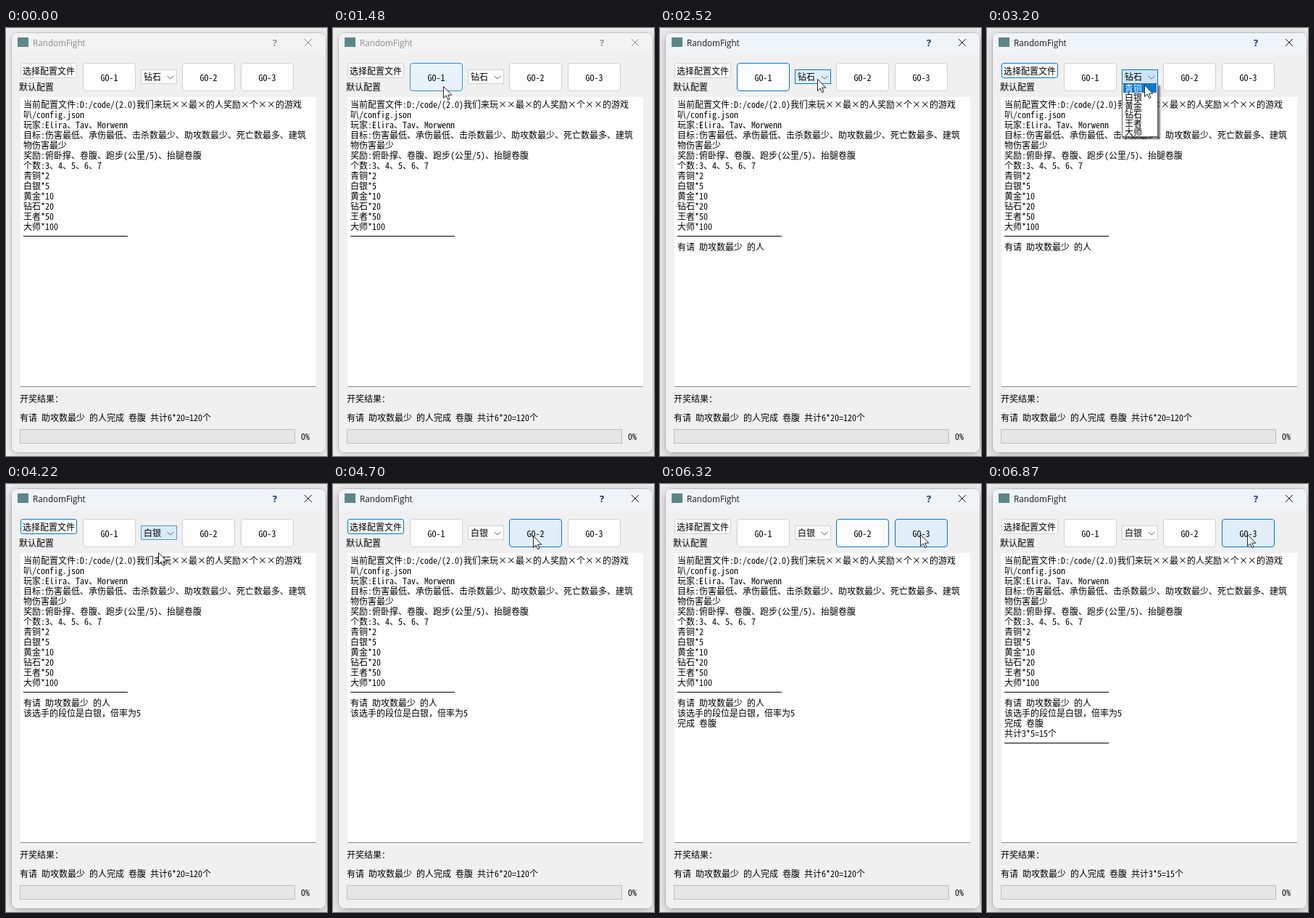
Recreate the animation shown at these times as an HTML page. Size 443 px wide and 589 px high, loop 8000 ms.

```html
<!DOCTYPE html>
<html lang="zh-CN">
<head>
<meta charset="utf-8">
<title>RandomFight</title>
<style>
  html, body { margin: 0; width: 100%; height: 100%; overflow: hidden; background: #ececec; }
  body { position: relative; color: #000; white-space: pre;
         font: 12px/14px "Noto Sans Mono CJK SC", "Noto Sans CJK SC", monospace; }
  body * { box-sizing: border-box; }
  .at { position: absolute; }
  #win { left: 8px; top: 7px; width: 433px; height: 577px; border-radius: 8px; overflow: hidden;
         background: #f0f0f0; }
  #bar { height: 29px; }
  #shade { left: 8px; top: 7px; width: 433px; height: 577px; border-radius: 8px; }
  #name { left: 37px; top: 13px; font: 11.700px/15px "Open Sans", sans-serif; }
  #help { left: 368px; top: 12px; font: 700 13px/16px "Open Sans", sans-serif; }
  .btn { border-radius: 4px; text-align: center;
         border: 1px solid color-mix(in srgb, #0078d4 var(--frame), #d0d0d0);
         background: color-mix(in srgb, #cce4f7 var(--press), color-mix(in srgb, #e0eef9 var(--hover), #fdfdfd)); }
  .go { top: 48px; width: 73px; height: 39px; line-height: 37px; }
  #pick { left: 20px; top: 48px; width: 78px; height: 21px; line-height: 20px; border-radius: 3px; }
  #combo { left: 186px; top: 57px; width: 50px; height: 20px; line-height: 18px; border-radius: 0;
           text-align: left; padding-left: 3px; }
  #log { left: 20px; top: 95px; width: 408px; height: 399px; padding: 3px 4px; overflow: hidden;
         background: #fff; border-bottom: 1px solid #868686; }
  #log div { height: 14px; }
  #log hr { margin: 6px 0 7px; width: 144px; height: 1px; border: 0; background: #000; }
  #log i { display: inline-block; width: 12px; text-align: center; font-style: normal; }
  #list { left: 186px; top: 76px; width: 50px; height: 74px; padding: 0 1px; background: #fff;
          border: 1px solid #646464; box-shadow: 3px 3px 2px rgba(0,0,0,.5); }
  #list div { height: 12px; line-height: 12px; padding-left: 2px; }
  #list .on { background: #0078d7; color: #fff; }
  #track { left: 19px; top: 552px; width: 380px; height: 20px; background: #e6e6e6; border: 1px solid #bcbcbc; }
  svg { position: absolute; left: 0; top: 0; overflow: visible; fill: none; }
</style>
</head>
<body>
<div id="shade" class="at"></div>
<div id="win" class="at"><div id="bar"></div></div>
<div class="at" style="left:16px;top:13px;width:15px;height:13px;background:#5b8688"></div>
<div id="name" class="at">RandomFight</div>
<div id="help" class="at">?</div>
<svg width="443" height="589"><path id="close" d="M412 15l10 10m0-10l-10 10"/></svg>

<div id="pick" class="at btn">选择配置文件</div>
<div class="at" style="left:18px;top:74px">默认配置</div>
<div id="go1" class="at btn go" style="left:106px">GO-1</div>
<div id="combo" class="at btn"></div>
<svg width="443" height="589"><path d="M222.500 66l4.500 4 4.500-4" stroke="#666"/></svg>
<div id="go2" class="at btn go" style="left:243px">GO-2</div>
<div id="go3" class="at btn go" style="left:324px">GO-3</div>

<div id="log" class="at"></div>
<div class="at" style="left:19px;top:503px">开奖结果：</div>
<div id="result" class="at" style="left:19px;top:529px"></div>
<div id="track" class="at"></div>
<div class="at" style="left:407px;top:555px">0%</div>
<div id="list" class="at"></div>
<svg id="cursor" width="14" height="21"><path d="M.5 .5V16.500L4.200 13 6.700 18.700 9 17.700 6.600 12.200H11.800Z" fill="#fff" stroke="#222"/></svg>

<script>
const $ = id => document.getElementById(id);
const LOOP = 8000, ENTER = 940, CHOOSE = 4150;
const HOLD = 130;              // button down to button up
const FADE = 280, SAMPLES = 8; // control colours follow their state over this time
const clicks = { go1: 1750, combo: 2770, go2: 5560, go3: 6390 };
const ranks = ['青铜', '白银', '黄金', '钻石', '王者', '大师'];
const RULE = '<hr>';

const config = `当前配置文件:D:/code/(2.0)我们来玩××最×的人奖励×个××的游戏
叭/config.json
玩家:Elira、Tav、Morwenn
目标:伤害最低、承伤最低、击杀数最少、助攻数最少、死亡数最多、建筑
物伤害最少
奖励:俯卧撑、卷腹、跑步(公里/5)、抬腿卷腹
个数:3、4、5、6、7
青铜*2
白银*5
黄金*10
钻石*20
王者*50
大师*100
${RULE}`.split('\n').map(text => ({ text, from: 0 }));

const lines = [...config,
  { text: '有请 助攻数最少 的人', from: clicks.go1 + HOLD },
  { text: '该选手的段位是白银，倍率为5', from: CHOOSE },
  { text: '完成 卷腹', from: clicks.go2 + HOLD },
  { text: '共计3*5=15个', from: clicks.go3 + HOLD },
  { text: RULE, from: clicks.go3 + HOLD }];

// Mouse moves: start, end, tip x, tip y
const moves = [
  [ENTER, 1620, 150, 79], [2030, 2500, 217, 70], [2990, 3060, 217, 77], [3200, 3370, 214, 106],
  [3380, 3550, 212, 86], [3800, 3880, 210, 94], [4220, 4700, 276, 71], [5880, 6320, 359, 69]
];

function cursorAt(t) {
  let x = 440, y = 146;
  for (const [start, end, toX, toY] of moves) {
    const u = Math.min(1, Math.max(0, (t - start) / (end - start)));
    const k = 1 - (1 - u) ** 3;
    x += (toX - x) * k;
    y += (toY - y) * k;
  }
  return { x, y };
}

const isOpen = t => t >= clicks.combo && t < CHOOSE;

// Opening the list hands the focus to the first button of the dialog
function focusAt(t) {
  const last = Object.keys(clicks).filter(id => t >= clicks[id]).pop();
  return last === 'combo' ? 'pick' : last;
}

function stateAt(el, t) {
  const { x, y } = cursorAt(t);
  const open = el.id === 'combo' && isOpen(t);
  const hover = open || x >= el.offsetLeft && x < el.offsetLeft + el.offsetWidth &&
                        y >= el.offsetTop && y < el.offsetTop + el.offsetHeight;
  const press = open || t >= clicks[el.id] && t < clicks[el.id] + HOLD;
  return { hover, press, frame: hover || focusAt(t) === el.id };
}

function paint(el, t) {
  const sum = { hover: 0, press: 0, frame: 0 };
  for (let i = 0; i < SAMPLES; i++) {
    const state = stateAt(el, t - FADE * i / SAMPLES);
    for (const key in sum) sum[key] += state[key];
  }
  for (const key in sum) el.style.setProperty('--' + key, sum[key] / SAMPLES * 100 + '%');
}

$('log').innerHTML = lines.map(({ text }) =>
  text === RULE ? text : `<div>${text.replace(/×/g, '<i>×</i>')}</div>`).join('');
$('list').innerHTML = ranks.map(r => `<div>${r}</div>`).join('');
const buttons = document.querySelectorAll('.btn');

function draw(t) {
  const active = t >= clicks.go1;
  const ink = active ? '#1a1a1a' : '#8c8c8c';
  $('name').style.color = ink;
  $('help').style.color = active ? '#12365e' : '#929292';
  $('close').style.stroke = ink;
  $('bar').style.background = active ? '#eff4f9' : '#f3f3f3';
  $('shade').style.boxShadow = '0 0 0 1px rgba(0,0,0,.12), ' +
    (active ? '0 3px 14px rgba(0,0,0,.28)' : '0 2px 8px rgba(0,0,0,.18)');

  buttons.forEach(el => paint(el, t));
  lines.forEach(({ from }, i) => {
    $('log').children[i].style.visibility = t >= from ? 'visible' : 'hidden';
  });
  $('combo').textContent = t < CHOOSE ? '钻石' : '白银';
  $('result').textContent = '有请 助攻数最少 的人完成 卷腹 共计' +
    (t < clicks.go3 + HOLD ? '6*20=120个' : '3*5=15个');

  const { x, y } = cursorAt(t);
  $('cursor').style.display = t < ENTER ? 'none' : 'block';
  $('cursor').style.transform = `translate(${Math.round(x)}px, ${Math.round(y)}px)`;

  $('list').style.display = isOpen(t - 70) && t < CHOOSE ? 'block' : 'none';
  const hot = y < 76.500 ? 3 : Math.floor((y - 76.500) / 12);
  ranks.forEach((_, i) => $('list').children[i].classList.toggle('on', i === hot));
}

function tick() {
  draw(performance.now() % LOOP);
  requestAnimationFrame(tick);
}
tick();
</script>
</body>
</html>
```
